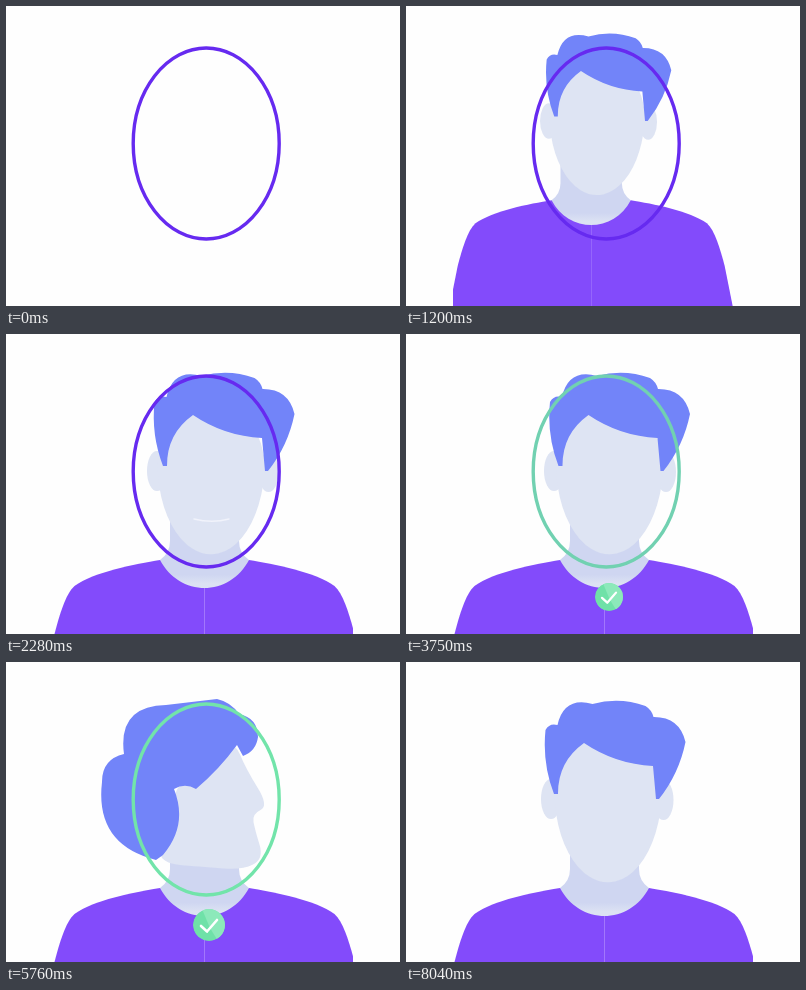
An HTML page that plays this animation: 394 by 300 pixels, repeating every 8070 ms.

```html
<!DOCTYPE html>
<html lang="en">
<head>
<meta charset="utf-8">
<title>Face check</title>
<style>
html, body { margin: 0; width: 100%; height: 100%; overflow: hidden; background: #fefefe; }
svg { display: block; width: 394px; height: 300px; }
</style>
</head>
<body>
<svg viewBox="0 0 394 300">
  <defs>
    <clipPath id="view"><rect x="47" width="300" height="300"/></clipPath>
    <clipPath id="disc"><circle r="16"/></clipPath>
    <linearGradient id="skin" gradientUnits="userSpaceOnUse" x1="0" y1="200" x2="0" y2="254">
      <stop offset=".75" stop-color="#cfd6f1"/>
      <stop offset=".92" stop-color="#dce2f3"/>
    </linearGradient>
    <path id="side" d="M0 226H-44.500C-69 230 -111 238 -130 252C-139 260 -145 281 -150 300L-160 350H0Z"/>
    <path id="throat" d="M.5 180H-34.500V207Q-34.500 219 -44.500 226C-35 244 -18 254 .5 254Z"/>
  </defs>
  <g clip-path="url(#view)">
    <g id="person">
      <g fill="#834bfb">
        <use href="#side" x="198.5"/>
        <use href="#side" transform="matrix(-1 0 0 1 198.5 0)"/>
      </g>
      <g fill="url(#skin)">
        <use href="#throat" x="198.5"/>
        <use href="#throat" transform="matrix(-1 0 0 1 198.5 0)"/>
      </g>
      <g fill="#dee4f3">
        <ellipse id="earL" rx="10" ry="20"/>
        <ellipse id="earR" rx="10" ry="20"/>
        <path id="face"/>
      </g>
      <path id="mouth" d="M188 185Q206 189.500 223 185" fill="none" stroke="#f1f3fb" stroke-width="1.3" stroke-linecap="round"/>
      <path id="hair" fill="#7284f9"/>
    </g>
  </g>
  <ellipse id="oval" cx="200.2" cy="137.5" rx="73" ry="95.5" fill="none" stroke-width="3.4"/>
  <g id="arrow" fill="none" stroke="#fff" stroke-width="3" stroke-linecap="round" stroke-linejoin="round">
    <path id="shaft" d="M163 261Q198 287 232 263" pathLength="1"/>
    <path id="tip" d="M225 261L234 261L231 268"/>
  </g>
  <g id="badge">
    <g clip-path="url(#disc)">
      <circle r="16" fill="#6fe1a8"/>
      <path d="M-7 -16L1 3L9 16H16V-16Z" fill="#8ce9ba"/>
    </g>
    <path d="M-8 1L-2 6.500L8 -5" fill="none" stroke="#fff" stroke-width="2.6" stroke-linecap="round" stroke-linejoin="round"/>
  </g>
</svg>
<script>
const LOOP = 8070, STEP = 30;
const el = id => document.getElementById(id);
const set = (id, attrs) => {
  for (const k in attrs) el(id).setAttribute(k, attrs[k]);
};
const parse = text => text.split(" ").map(s => s.split(",").map(Number));

// Each hair point is x, y and the outward bulge of the edge that leaves it.
const hairFront = parse("152.5,132,.06 144,68,.2 156,63,.26 191,42,.08 244,44,.1 252,55,.2 284,80,.06 257.5,137,0 254.5,137,0 251.5,104,.07 182.5,81,-.13 156.5,132,0");
const hairSide = parse("150,198,.22 96,120,.2 118,92,.28 160,43,0 211,37,.1 233,52,.2 252,75,.15 237,94,0 231,83,.03 190,127,-.15 168,127,.15 157,193,0");

// The profile; seen from the front the same points lie on an oval.
const faceSide = parse("228,78 240,107 263,144 246,152 249,168 258,197 236,208 200,205 158,202 152,186 168,160 175,130 200,90");
const faceFront = faceSide.map((_, i, all) => {
  const a = (i / all.length) * 2 * Math.PI - 1.22;
  const down = Math.sin(a);
  return [203.5 + 55 * Math.cos(a), 130 + (down > 0 ? 93 : 60) * down];
});

const mix = (a, b, p) => a + (b - a) * p;
const blend = (a, b, p) => a.map((pt, i) => pt.map((v, k) => mix(v, b[i][k], p)));
const span = (t, a, b) => Math.min(1, Math.max(0, (t - a) / (b - a)));
const inOut = (p, n) => p < .5 ? 2 ** (n - 1) * p ** n : 1 - 2 ** (n - 1) * (1 - p) ** n;
const ease = (t, a, b, n = 3) => inOut(span(t, a, b), n);

function bulgedPath(pts) {
  return pts.reduce((d, [x, y, bulge], i) => {
    const [nx, ny] = pts[(i + 1) % pts.length];
    const cx = (x + nx) / 2 + 2 * bulge * (ny - y);
    const cy = (y + ny) / 2 - 2 * bulge * (nx - x);
    return `${d}Q${cx} ${cy} ${nx} ${ny}`;
  }, "M" + pts[0].slice(0, 2));
}

function smoothPath(pts) {
  const mid = i => blend([pts[i]], [pts[(i + 1) % pts.length]], .5)[0];
  return pts.reduce((d, p, i) => `${d}Q${p} ${mid(i)}`, "M" + mid(pts.length - 1));
}

function drawPerson(t) {
  const enter = ease(t, 270, 1230), settle = ease(t, 1230, 1890);
  const x = mix(mix(140, 8.5, enter), 0, settle);
  const y = mix(mix(260, -7, enter), 0, settle);
  set("person", {
    visibility: t < 270 ? "hidden" : "visible",
    transform: `translate(${x} ${y}) scale(${mix(.89, 1, settle)})`
  });

  const turn = ease(t, 3720, 5340, 4) - ease(t, 7190, 8050);
  const arc = 4 * Math.sin(Math.PI * turn);
  const sway = 1 - ease(t, 2400, 3270, 2) - ease(t, 7200, 8040);
  set("hair", {
    d: bulgedPath(blend(hairFront, hairSide, turn)),
    transform: `translate(${4.5 * sway + arc / 2})`
  });
  set("face", {
    d: smoothPath(blend(faceFront, faceSide, turn)),
    transform: `translate(${1.5 * sway + arc})`
  });
  set("earL", { cx: mix(148, 178, turn) + 3 * sway + arc, cy: mix(137, 142, turn) });
  set("earR", { cx: mix(260, 220, turn) + 2.5 * sway, cy: 138 });
  set("mouth", { opacity: span(t, 2100, 2280) * (1 - span(t, 2640, 2880)) });
}

function drawMarks(t) {
  const green = span(t, 3030, 3210) - span(t, 3730, 3930) + span(t, 5500, 5640);
  const gone = span(t, 6670, 6870);
  const rgb = blend([[102, 42, 240]], [[114, 228, 170]], green)[0];
  set("oval", { stroke: `rgb(${rgb.map(Math.round)})`, opacity: 1 - gone });

  const size = ease(t, 3030, 3270, 2) - span(t, 3730, 3890) + ease(t, 5510, 5750, 2) - gone;
  set("badge", {
    transform: `translate(203 263) scale(${size})`,
    visibility: size > .01 ? "visible" : "hidden"
  });

  const drawn = ease(t, 4050, 4440, 2);
  set("arrow", {
    opacity: 1 - span(t, 5220, 5370),
    visibility: drawn > 0 ? "visible" : "hidden"
  });
  set("shaft", { "stroke-dasharray": `${drawn} 2` });
  set("tip", { opacity: span(drawn, .85, 1) });
}

const start = performance.now();
function frame() {
  const now = (performance.now() - start) % LOOP;
  const t = Math.floor(now / STEP) * STEP;
  drawPerson(t);
  drawMarks(t);
  requestAnimationFrame(frame);
}
frame();
</script>
</body>
</html>
```
